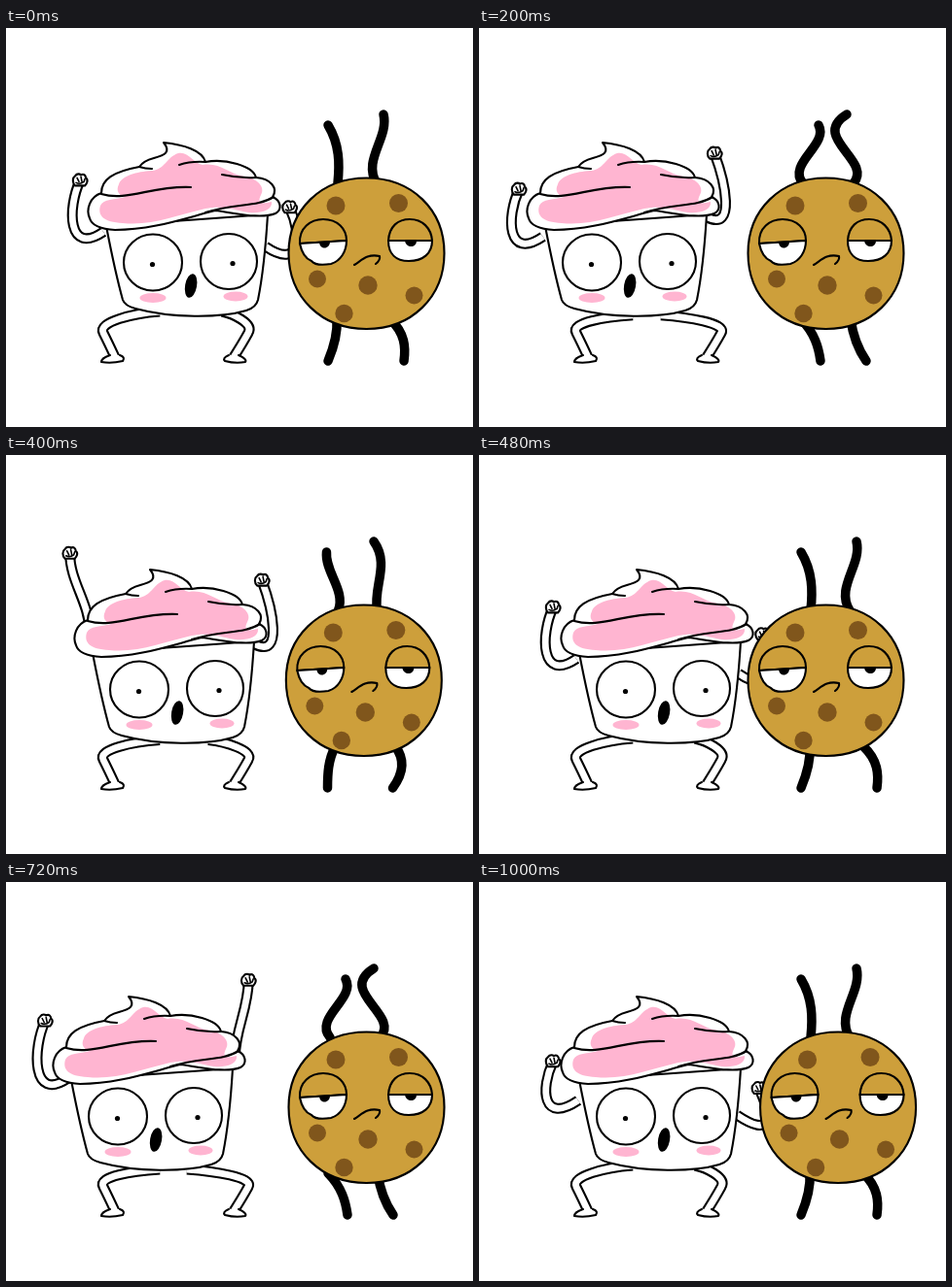
An HTML page for the animation above (1040 ms loop, 480 px wide and 411 px high).

```html
<!DOCTYPE html>
<html lang="en">
<head>
<meta charset="utf-8">
<title>Dancing cupcake and cookie</title>
<style>
  html, body { margin: 0; width: 100%; height: 100%; overflow: hidden; background: #fff; }
  svg { display: block; width: 100%; height: 100%; }
  .line { fill: none; stroke: #000; stroke-width: 2.1; stroke-linecap: round; stroke-linejoin: round; }
  .thin { stroke-width: 1.6; }
  .white { fill: #fff; }
  .pink { fill: #ffb5d1; }
  .dough { fill: #cd9f3b; }
  .chip { fill: #80561c; }
  .outer, .inner { fill: none; stroke: #000; stroke-width: 11; stroke-linejoin: round; }
  .inner { stroke: #fff; stroke-width: 6.8; }
  .limb { fill: none; stroke: #000; stroke-width: 9.5; stroke-linecap: round; }
</style>
</head>
<body>
<svg viewBox="0 0 480 411">
  <defs>
    <g id="fist">
      <path class="line white" d="M-5 5C-8 2-8-3-5-5C-3-8 0-7 1-6C4-8 6-5 6-3C9-1 7 3 5 5Z"/>
      <path class="line thin" d="M-3-3L-1 1M1-4L2 1M5-2L4 1M-4 2Q0 4 4 1"/>
    </g>
  </defs>

  <g id="legs">
    <path class="outer left"/><path class="inner left"/>
    <path class="outer right"/><path class="inner right"/>
    <path class="line white" d="M107 337Q98 340 98 344Q108 346 120 343Q123 339 117 337"/>
    <path class="line white" d="M229 337Q222 340 225 343Q236 346 246 344Q248 341 239 337"/>
  </g>

  <g id="cup">
    <g id="armL"><path class="outer"/><path class="inner"/><use href="#fist"/></g>
    <g id="armR"><path class="outer"/><path class="inner"/><use href="#fist"/></g>
    <path class="line white" d="M103 204C109 235 115 262 120 280Q122 286 133 289C170 299 220 299 247 291Q257 288 259 280C264 255 267 225 269 192Z"/>
    <path class="line white" d="M162 118C182 120 202 126 205 138C225 134 254 142 257 154C272 155 280 165 274 174C283 178 284 187 277 191C262 197 238 191 215 188C180 197 150 208 112 208C96 207 88 203 86 196C82 187 86 174 98 170C98 156 110 148 137 143Q141 137 152 134C163 131 170 128 162 118Z"/>
    <path class="pink" d="M177 129C188 127 192 139 202 141C220 138 228 150 245 153C262 156 266 166 262 172C258 180 262 182 273 179C274 188 262 191 250 190C235 188 225 182 205 186C175 193 150 204 120 201C100 200 94 193 97 183C100 176 112 177 122 174C115 172 113 167 116 161C119 152 134 148 150 147C163 146 165 133 177 129Z"/>
    <path class="line" d="M98 171C125 179 150 162 190 164M205 138Q190 137 178 141M257 154Q240 155 222 151M275 174C258 185 235 180 205 190M137 143Q143 145 150 145"/>
    <ellipse class="line white" cx="151" cy="241.500" rx="30" ry="29"/>
    <ellipse class="line white" cx="229" cy="240.500" rx="29" ry="28.500"/>
    <circle cx="150.500" cy="243.500" r="2.600"/>
    <circle cx="233" cy="242.500" r="2.600"/>
    <ellipse cx="190" cy="265.500" rx="6" ry="12.500" transform="rotate(10 190 266)"/>
    <ellipse class="pink" cx="151" cy="278" rx="13.500" ry="5"/>
    <ellipse class="pink" cx="236" cy="276.500" rx="12.500" ry="5"/>
  </g>

  <g id="limbs"></g>

  <g id="cookie">
    <path class="line dough" d="M290.500 232C290.500 187 324 154.500 370.500 154.500S450.500 187 450.500 232S417 310 370.500 310S290.500 277 290.500 232Z"/>
    <g class="chip">
      <circle cx="339" cy="183" r="9.500"/>
      <circle cx="403.500" cy="180.500" r="9.500"/>
      <circle cx="320" cy="258.500" r="9"/>
      <circle cx="372" cy="265" r="9.700"/>
      <circle cx="419.500" cy="275.500" r="9"/>
      <circle cx="347.500" cy="294" r="9.200"/>
    </g>
    <path class="line dough" d="M302 222C301 206 313 197 326 197C341 197 350 207 350 219Z"/>
    <path class="line white" d="M302 222C304 232 309 238 314 240C318 245 328 244 334 243C344 240 350 230 350 219Z"/>
    <path d="M322 221L333 220C333 228 323 229 322 221Z"/>
    <path class="line dough" d="M393 219C394 204 403 197 415 197C428 197 437 206 438 219Z"/>
    <path class="line white" d="M393 219C393 233 401 240 414 240C429 240 438 232 438 219Z"/>
    <path d="M410 219H422C422 227 411 227 410 219Z"/>
    <path class="line" d="M358 244C365 240 371 232 384 235Q385 239 380 243"/>
  </g>
</svg>
<script>
  const FRAME = 40, COUNT = 26, TAU = 2 * Math.PI;
  const $ = s => document.querySelector(s);
  const clamp = (v, lo = 0, hi = 1) => Math.min(hi, Math.max(lo, v));
  const mix = (a, b, k) => a + (b - a) * k;

  // Finds the segment of [time, value] keys around n and how far along it n is.
  function segment(keys, n) {
    const i = Math.max(1, keys.findIndex(k => k[0] >= n));
    const [t0, a] = keys[i - 1], [t1, b] = keys[i];
    return [a, b, (n - t0) / (t1 - t0)];
  }
  const track = (keys, n) => mix(...segment(keys, n));

  const cupPath = [[0, 0], [6, -42], [12, 0], [17, -36], [20, -36], [25, 0]];
  const ARM_CYCLE = 12, LIMB_CYCLE = 13;

  // How far each arm is lowered: 0 is overhead, 1 is at its lowest.
  const lowered = {
    L: [[0, 0.6], [2, 1], [3, 1], [9, 0], [12, 0.6]],
    R: [[0, 0.8], [1, 1], [2, 1], [7, 0], [8, 0], [12, 0.8]]
  };

  // Cookie limbs from root to tip, sideways only; heights are evenly spaced.
  const heights = [[160, 100], [160, 89], [300, 343], [300, 343]];
  const stand = [[341, 343, 343, 331], [381, 366, 394, 388], [340, 341, 337, 331], [395, 410, 411, 409]];
  const bow = [[333, 360, 360, 334], [379, 377, 377, 386], [354, 350, 342, 334], [397, 401, 401, 408]];
  const lean = [[333, 316, 360, 349], [385, 405, 340, 378], [331, 345, 349, 351], [382, 384, 388, 398]];
  const curl = [[342, 356, 312, 328], [382, 388, 396, 368], [337, 321, 324, 330], [405, 412, 405, 386]];
  const limbPoses = [[0, stand], [2, bow], [5, lean], [8, curl], [12, stand]];

  const cubic = ([start, ...rest]) => `M${start}C${rest.join(" ")}`;
  const setPath = (root, sel, d) =>
    root.querySelectorAll(sel).forEach(el => el.setAttribute("d", d));
  const shift = (el, x, y = 0) => el.setAttribute("transform", `translate(${x} ${y})`);

  const legs = $("#legs"), cup = $("#cup"), cookie = $("#cookie");
  const limbs = heights.map(() => {
    const el = document.createElementNS("http://www.w3.org/2000/svg", "path");
    el.setAttribute("class", "limb");
    return $("#limbs").appendChild(el);
  });

  // The arm is straight overhead and bends outwards as it comes down.
  function drawArm(side, n) {
    const u = track(lowered[side], n % ARM_CYCLE);
    const left = side === "L", out = left ? -1 : 1;
    const bend = clamp(4 * u - 0.8);
    const fx = left ? 76 + 14 * (1 - u) ** 6 : 284.5 + 7.5 * Math.cos(TAU * u / 0.85);
    const fy = 74 + 139 * u;
    const sx = left ? fx + 18 + 10 * u : 273 - 8 * u;
    const sy = 165 + 75 * u;
    const root = $("#arm" + side);
    setPath(root, "path", cubic([
      [sx, sy],
      [sx + out * 37 * bend, sy + mix(-27, 25, bend)],
      [fx + out * 13 * bend, fy + 28],
      [fx, fy]
    ]));
    shift(root.querySelector("use"), fx, fy);
  }

  function drawLimbs(n) {
    const [a, b, k] = segment(limbPoses, n % LIMB_CYCLE);
    limbs.forEach((el, j) => {
      const points = a[j].map((x, i) => [mix(x, b[j][i], k), mix(...heights[j], i / 3)]);
      el.setAttribute("d", cubic(points));
    });
  }

  function drawLegs(x) {
    const hip = 292 - x / 9;
    setPath(legs, ".left", `M158 ${hip}C130 ${hip + 2} 94 303 100 314Q105 324 112 339`);
    setPath(legs, ".right", `M${222 + x} ${hip}C${232 + x / 2} ${hip + 2} 255 304 249 314Q243 325 234 339`);
  }

  // A quick sway with a short rest at both ends.
  function cookieShift(n) {
    const fromMiddle = Math.abs(n % (COUNT / 3) - 4.4);
    return -clamp(6.2 * (3.5 - fromMiddle), 0, 14);
  }

  function draw(n) {
    const x = track(cupPath, n);
    shift(cup, x);
    shift(cookie, cookieShift(n));
    drawArm("L", n);
    drawArm("R", n);
    drawLegs(x);
    drawLimbs(n);
  }

  const start = performance.now();
  function tick() {
    draw(Math.floor((performance.now() - start) / FRAME) % COUNT);
    requestAnimationFrame(tick);
  }
  tick();
</script>
</body>
</html>
```
